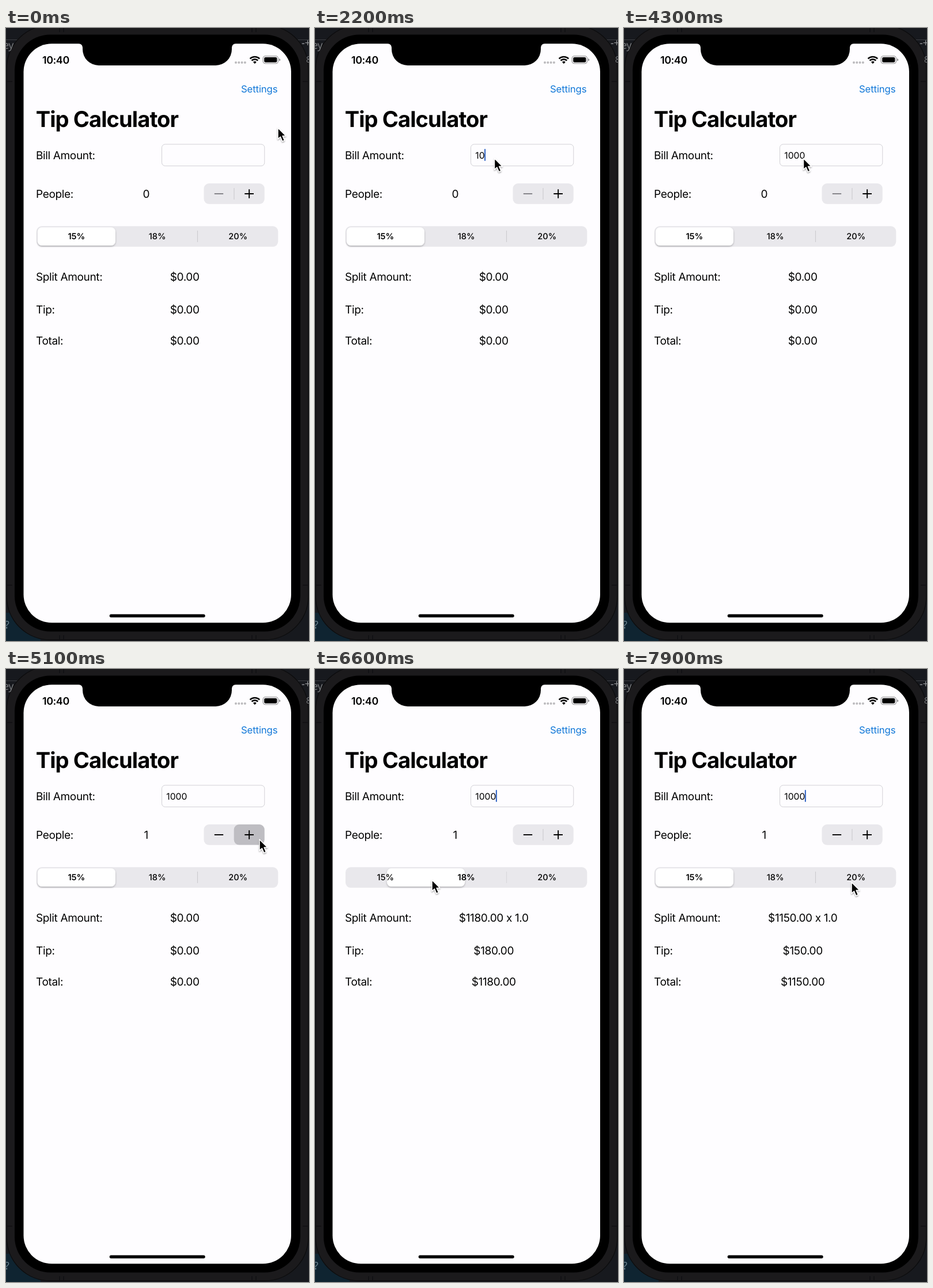
Animation of 526x1065 px, one loop 8 s. Source, as an HTML page:

```html
<!DOCTYPE html>
<html lang="en">
<head>
<meta charset="utf-8">
<title>Tip Calculator</title>
<style>
  html, body { margin: 0; width: 100%; height: 100%; overflow: hidden; background: #17191e; }
  svg { display: block; width: 526px; height: 1065px; }
  text { font: 19.05px Inter, "Liberation Sans", sans-serif; letter-spacing: -.37px; text-rendering: geometricPrecision; }
  .title { font-size: 38.1px; font-weight: 700; letter-spacing: -.92px; }
  .clock { font-size: 17.9px; font-weight: 600; letter-spacing: -.4px; }
  .link { font-size: 16.8px; letter-spacing: -.15px; fill: #1278d8; }
  .field { font-size: 15.7px; letter-spacing: 0; }
  .seg { font-size: 14.6px; font-weight: 500; letter-spacing: 0; }
  .mid { text-anchor: middle; }
  .code { font: 18px "Open Sans", sans-serif; }
</style>
</head>
<body>
<svg viewBox="0 0 526 1065">
  <defs>
    <filter id="soft" x="-20%" y="-40%" width="140%" height="190%">
      <feDropShadow dx="0" dy="1.5" stdDeviation="1.5" flood-opacity=".28"/>
    </filter>
    <filter id="drop" x="-50%" y="-30%" width="220%" height="180%">
      <feDropShadow dx="0" dy="1.5" stdDeviation="1.3" flood-opacity=".4"/>
    </filter>
  </defs>

  <!-- editor behind the phone -->
  <rect width="526" height="1065" fill="#17191e"/>
  <rect y="1016" width="60" height="49" fill="#0f2431"/>
  <path d="M0 20.5H22M506 20.5H526" stroke="#3c3e42"/>

  <!-- phone -->
  <rect x="1" y="-5" width="524" height="1068" rx="76" fill="#1b1a1c" stroke="#0d0d0e" stroke-width="1.5"/>
  <path d="M93 0V7M100 0V7M427 0V7M434 0V7M93 1055V1062M100 1055V1062M427 1055V1062M434 1055V1062M1 93H11M1 968H11M515 93H525M515 968H525" stroke="#111113" stroke-width="1.5"/>
  <rect x="15" y="11.5" width="496" height="1037" rx="62" fill="#000"/>
  <text class="code" x="-5" y="36" fill="#7d7f82">ey</text>
  <text class="code" x="513" y="32" fill="#96989b">-+</text>
  <text class="code" x="521" y="60" fill="#7d7f82" style="font-size:15px">8</text>
  <text class="code" x="-2" y="1043" fill="#6f8793">?</text>
  <rect x="30.5" y="27.3" width="464.5" height="1006" rx="49" fill="#fefdff"/>
  <path d="M126 27A7 7 0 0 1 133 34V37A28 28 0 0 0 161 65H364A28 28 0 0 0 392 37V34A7 7 0 0 1 399 27Z"/>
  <rect x="179.7" y="1018.4" width="166" height="5.5" rx="2.75"/>

  <!-- status bar -->
  <text class="clock" x="63" y="62">10:40</text>
  <path d="M399 60H415" stroke="#bbbabd" stroke-width="4" stroke-linecap="round" stroke-dasharray="0 5.3"/>
  <g fill="none" stroke="#000" stroke-width="2.6">
    <path d="M423.6 53.4A12 12 0 0 1 440.2 53.4M426.5 56.5A7.8 7.8 0 0 1 437.3 56.5"/>
    <path d="M431.9 62.2L429 59.1A4.2 4.2 0 0 1 434.8 59.1Z" fill="#000" stroke="none"/>
  </g>
  <rect x="446.2" y="48.7" width="26.2" height="13" rx="4" fill="none" stroke="#8b8a8d" stroke-width="1.1"/>
  <rect x="448.2" y="50.7" width="22.2" height="9" rx="2.3"/>
  <path d="M474 52.8Q476.2 53.6 476.2 55.2T474 57.6Z" fill="#8b8a8d"/>

  <!-- form -->
  <text class="link" x="408" y="112.3">Settings</text>
  <text class="title" x="51.7" y="171.6">Tip Calculator</text>
  <text x="52" y="228">Bill Amount:</text>
  <text x="52" y="295">People:</text>
  <text x="52" y="439.3">Split Amount:</text>
  <text x="52" y="496.3">Tip:</text>
  <text x="52" y="550.3">Total:</text>

  <rect x="270.5" y="202" width="178.3" height="37.6" rx="5.8" fill="#fefdff" stroke="#d2d1d6"/>
  <text class="field" id="bill" x="278.3" y="226.7"></text>
  <rect id="caret" y="210" width="2" height="21" rx="1" fill="#2f63c4"/>

  <text class="mid" id="people" x="243.3" y="294.6">0</text>
  <rect x="343.5" y="270" width="105.3" height="35.8" rx="9" fill="#e9e8ec"/>
  <path id="divider" d="M396 278V298" stroke="#cac9ce" stroke-width="1.1"/>
  <rect id="press" x="395.7" y="270" width="53" height="35.6" rx="9" fill="#bebdc2"/>
  <path id="minus" d="M361.8 288H377.2" stroke-width="1.9"/>
  <path d="M414.3 288H430M422.2 280.2V295.8" stroke="#000" stroke-width="1.9"/>

  <rect x="53" y="344.3" width="419.3" height="35.8" rx="9" fill="#e9e8ec"/>
  <path id="sep" d="M332.5 352V372" stroke="#cac9ce" stroke-width="1.1"/>
  <rect id="knob" x="54.8" y="346.2" width="135.2" height="31.8" rx="7.5" fill="#fff" filter="url(#soft)"/>
  <text class="seg mid" id="seg0" x="122.3" y="367.3">15%</text>
  <text class="seg mid" id="seg1" x="262.7" y="367.3">18%</text>
  <text class="seg mid" x="402.8" y="367.3">20%</text>

  <text class="mid" id="split" x="310.2" y="439.3"></text>
  <text class="mid" id="tip" x="310.2" y="496.3"></text>
  <text class="mid" id="total" x="310.2" y="550.3"></text>

  <path id="pointer" d="M0 0V19.4L4.4 15.5L7.7 23.4L11.4 21.8L8.1 14H13.9Z" stroke="#fff" stroke-width="1.5" stroke-linejoin="round" filter="url(#drop)"/>
</svg>
<script>
const LOOP = 8000, STEP = 100;
const $ = id => document.getElementById(id);
const clamp = v => Math.min(1, Math.max(0, v));
const ease = v => v * v * (3 - 2 * v);
const ramp = (t, from, to) => ease(clamp((t - from) / (to - from)));

// pointer stops: time, x, y
const path = [
  [0, 472, 173.5], [100, 470, 174], [800, 311.5, 226.5], [4400, 311.5, 226.5],
  [4900, 440, 296], [5500, 440, 296], [6200, 203, 366.5], [6800, 203, 366.5],
  [7100, 169, 370.5], [7400, 160, 371], [7900, 395, 370.5]
];
const keys = [2000, 2200, 2400, 2560];
const TAP_FIELD = 900, PRESS = 5000, RELEASE = 5200, PICK_18 = 6500, PICK_15 = 7400;

function pointerAt(t) {
  let i = 1;
  while (i < path.length - 1 && path[i][0] < t) i++;
  const [t0, x0, y0] = path[i - 1], [t1, x1, y1] = path[i];
  const k = ramp(t, t0, t1);
  return [x0 + (x1 - x0) * k, y0 + (y1 - y0) * k];
}

function caretAlpha(t) {
  if (t < TAP_FIELD) return 0;
  const reset = Math.max(TAP_FIELD, ...keys.filter(k => k <= t));
  const p = (t - reset) % 980;
  return Math.max(1 - clamp((p - 460) / 105), clamp((p - 860) / 120));
}

function draw(t) {
  const typed = keys.filter(k => k <= t).length;
  const bill = $('bill');
  bill.textContent = '1000'.slice(0, typed);
  $('caret').setAttribute('x', typed ? 277.8 + bill.getComputedTextLength() : 278.5);
  $('caret').setAttribute('opacity', caretAlpha(t));

  const counted = t >= PRESS, pressed = counted && t < RELEASE;
  $('people').textContent = counted ? 1 : 0;
  $('press').setAttribute('opacity', pressed ? 1 : 0);
  $('divider').setAttribute('opacity', pressed ? 0 : 1);
  $('minus').setAttribute('stroke', counted ? '#000' : '#818085');

  const slide = ramp(t, PICK_18 - 50, PICK_18 + 250) - ramp(t, PICK_15 - 50, PICK_15 + 250);
  $('knob').setAttribute('transform', `translate(${140.3 * slide} 0)`);
  $('sep').setAttribute('opacity', 1 - slide);
  $('seg0').style.fontWeight = slide < .5 ? 600 : 500;
  $('seg1').style.fontWeight = slide < .5 ? 500 : 600;

  const rate = t < PICK_18 ? 0 : t < PICK_15 ? .18 : .15;
  const tip = 1000 * rate, total = rate ? 1000 + tip : 0;
  const money = v => '$' + v.toFixed(2);
  $('split').textContent = money(total) + (rate ? ' x 1.0' : '');
  $('tip').textContent = money(tip);
  $('total').textContent = money(total);

  $('pointer').setAttribute('transform', `translate(${pointerAt(t)})`);
}

const start = performance.now();
function tick() {
  const t = (performance.now() - start) % LOOP;
  draw(Math.floor(t / STEP) * STEP);
  requestAnimationFrame(tick);
}
tick();
</script>
</body>
</html>
```
